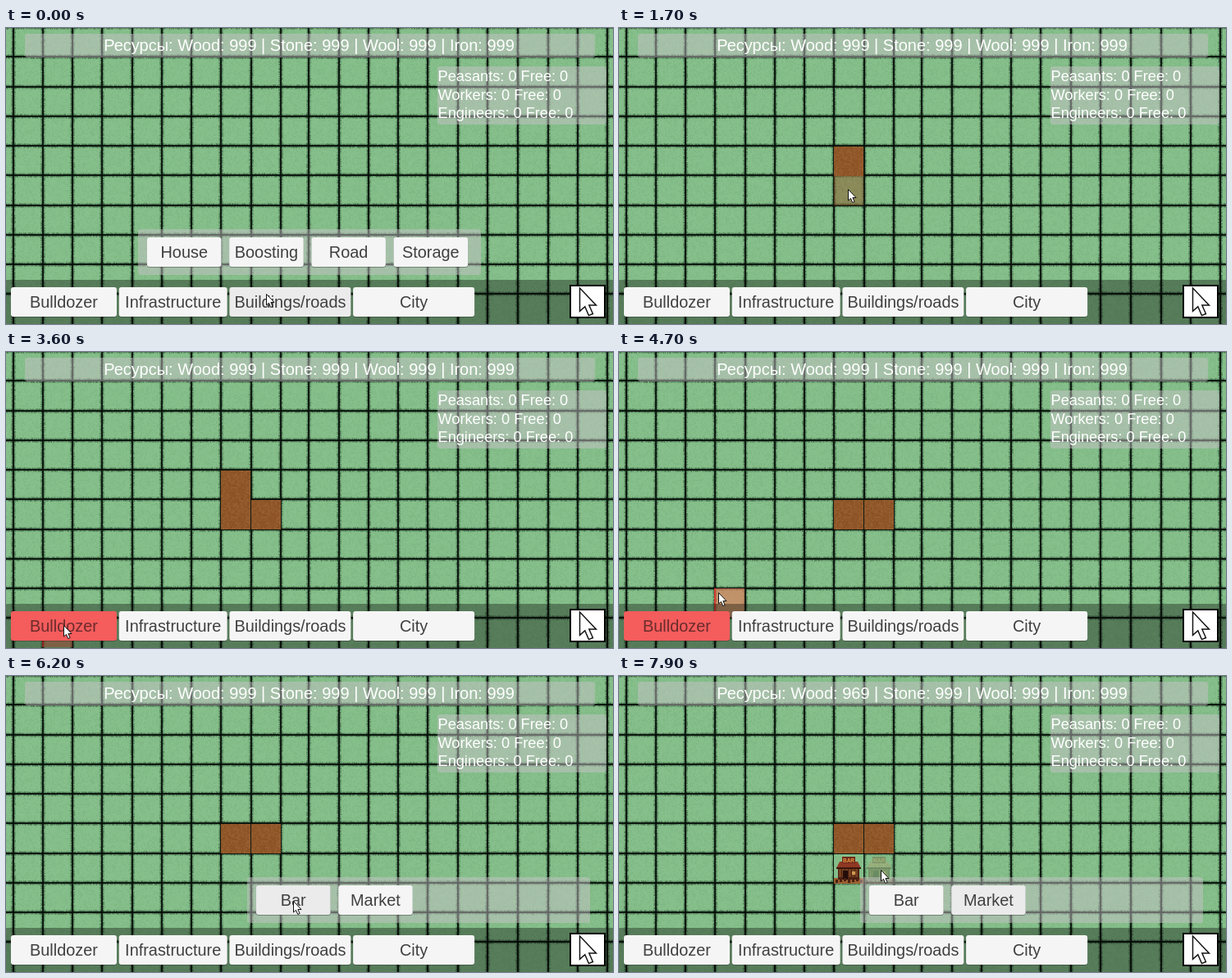
Write an HTML page with a canvas that moves like this. It is 740 px wide and 362 px high and loops after 8 s.

```html
<!DOCTYPE html>
<html>
<head>
<meta charset="utf-8">
<style>
html, body { margin: 0; width: 740px; height: 362px; overflow: hidden; }
canvas { display: block; }
</style>
</head>
<body>
<canvas id="stage" width="740" height="362"></canvas>
<script>
const g = document.getElementById('stage').getContext('2d');
const LOOP = 8000, STEP = 100, HOLD = 200, CELL = 36.22, X0 = 8.75, Y0 = -0.8;
const GLASS = 'rgba(200,194,200,.48)';

// The middle block of columns sits slightly to the left
const cellX = c => Math.round(X0 + c * CELL - (c > 9 && c < 17 ? 1.5 : 0));
const cellY = r => Math.round(Y0 + r * CELL);
const within = (t, a, b) => t >= a && t < b;

let seed = 7;
const rnd = () => (seed = (seed * 16807) % 2147483647) / 2147483647;

function layer(w, h, paint) {
  const c = document.createElement('canvas');
  c.width = w;
  c.height = h;
  paint(c.getContext('2d'), w, h);
  return c;
}

function rect(c, color, x, y, w, h) {
  c.fillStyle = color;
  c.fillRect(x, y, w, h);
}

function texture(c, color, w, h, strength) {
  rect(c, color, 0, 0, w, h);
  for (let y = 0; y < h; y += 2)
    for (let x = 0; x < w; x += 2)
      rect(c, `rgba(${rnd() < .5 ? '0,0,0' : '255,255,255'},${rnd() * strength})`, x, y, 2, 2);
}

// Rough hand-drawn line: soft edge, ragged fringe, dark core
function roughLine(c, at, length, vertical) {
  const strip = (color, off, along, size, len) => vertical
    ? rect(c, color, at + off, along, size, len)
    : rect(c, color, along, at + off, len, size);
  strip('rgba(30,70,40,.12)', -3, 0, 6, length);
  for (let i = 0; i < length; i++) {
    const a = rnd() * 1.8, b = rnd() * 1.8;
    strip('rgba(8,25,12,.38)', -1 - a, i, 2 + a + b, 1);
  }
  strip('rgba(5,14,7,.88)', -1, 0, 2, length);
}

const field = layer(740, 362, (c, w, h) => {
  texture(c, '#84be89', w, h, .03);
  for (let i = 0; i <= 20; i++) roughLine(c, cellX(i), h, true);
  for (let i = 0; i < 10; i++) roughLine(c, cellY(i), w, false);
});

const road = layer(36, 36, (c, w, h) => texture(c, '#905627', w, h, .055));

function shop(sign, roof) {
  return layer(36, 36, (c, w, h) => {
    texture(c, '#84be89', w, h, .03);
    rect(c, '#9b6030', 0, 29, w, 7);
    rect(c, '#4a2114', 5, 15, 26, 16);
    for (let x = 6; x < 30; x += 4) rect(c, '#75401f', x, 18, 3, 10);
    c.fillStyle = roof;
    c.beginPath();
    [[7, 9], [29, 9], [33, 17], [3, 17]].forEach(p => c.lineTo(...p));
    c.fill();
    rect(c, '#3b160d', 3, 16, 30, 2);
    rect(c, '#6e2819', 10, 3, 16, 8);
    c.fillStyle = '#e79a44';
    c.font = 'bold 6.5px "Liberation Sans", sans-serif';
    c.textAlign = 'center';
    c.fillText(sign, 18, 9.5);
    rect(c, '#240d09', 11, 20, 6, 11);
    rect(c, '#d29a50', 22, 21, 4, 4);
    for (let x = 2; x < 34; x += 5) rect(c, '#4a2012', x, 29 + x % 3, 3, 4);
  });
}
const bar = shop('BAR', '#8f3824');
const market = shop('MAR', '#c98a5a');

// Pointer stops: arrival time, x, y; it rests there for HOLD
const stops = [
  [0, 317, 325], [700, 384, 275], [1100, 265, 175], [1800, 281, 200],
  [2400, 321, 200], [3400, 70, 334], [4100, 273, 168], [4600, 121, 294],
  [5000, 72, 334], [5400, 315, 320], [5800, 495, 328], [6100, 350, 275],
  [6450, 280, 233], [6800, 397, 294], [7100, 530, 318], [7400, 450, 275],
  [7800, 319, 237]
];

function pointer(t) {
  const i = Math.max(0, stops.findLastIndex(s => s[0] <= t));
  const [t0, x0, y0] = stops[i];
  const [t1, x1, y1] = stops[i + 1] || [LOOP + HOLD, x0, y0];
  const k = Math.max(0, (t - t0 - HOLD) / (t1 - t0 - HOLD));
  const e = k * k * (3 - 2 * k);
  return [Math.round(x0 + (x1 - x0) * e), Math.round(y0 + (y1 - y0) * e)];
}

const put = (image, c, r) => g.drawImage(image, cellX(c), cellY(r) + 1);

function panel(x, y, w, h, color) {
  g.fillStyle = color;
  g.beginPath();
  g.roundRect(x, y, w, h, 3);
  g.fill();
}

function text(str, x, y, size, color, align) {
  g.font = size + 'px "Liberation Sans", Arial, sans-serif';
  g.fillStyle = color;
  g.textAlign = align;
  g.fillText(str, x, y);
}

function button(label, x, y, w, ui) {
  const [mx, my] = ui.mouse;
  const over = within(mx, x, x + w) && within(my, y, y + 36);
  const red = ui.bulldozing && label === 'Bulldozer';
  panel(x, y + 1, w, 36, 'rgba(40,40,40,.4)');
  panel(x, y, w, 36, red ? '#f55c5c' : over || ui.selected === label ? '#ebebeb' : '#f5f5f5');
  text(label, x + w / 2, y + 25, 19.9, red ? '#6b2c2c' : '#404040', 'center');
}

function menu(x, labels, ui) {
  panel(x, 246, 418, 56, GLASS);
  labels.forEach((label, i) => button(label, x + 11 + i * 100.2, 256, 90.5, ui));
}

function toolbar(ui) {
  rect(g, 'rgba(0,0,0,.35)', 0, 308, 740, 54);
  const widths = { Bulldozer: 129, Infrastructure: 132, 'Buildings/roads': 148, City: 148 };
  let x = 6;
  for (const label in widths) {
    button(label, x, 317, widths[label], ui);
    x += widths[label] + 2.7;
  }
}

function arrow(x, y, scale, line) {
  g.save();
  g.translate(x, y);
  g.scale(scale, scale);
  g.beginPath();
  [[0, 0], [0, 13.5], [3, 10.8], [5.2, 16], [7.6, 15], [5.4, 10], [9.5, 10]]
    .forEach(p => g.lineTo(...p));
  g.closePath();
  g.fillStyle = '#fff';
  g.fill();
  g.strokeStyle = '#111';
  g.lineWidth = line;
  g.stroke();
  g.restore();
}

// The preview snaps to the cell the pointer was over one step earlier
function drawGhost(t, bulldozing) {
  const [x, y] = pointer(t - STEP);
  const c = Math.floor((x - X0) / CELL), r = Math.floor((y - Y0) / CELL);
  if (bulldozing) {
    rect(g, 'rgba(231,122,87,.62)', cellX(c), cellY(r), 36, 36);
    rect(g, '#d33a30', cellX(c) - 1, cellY(r), 2, 36);
    return;
  }
  const image = within(t, 900, 2800) ? road
    : within(t, 6200, 7100) ? bar
    : t >= 7500 ? market : null;
  if (!image) return;
  g.globalAlpha = image === road ? .5 : .28;
  put(image, c, r);
  g.globalAlpha = 1;
}

function draw(t) {
  const built = t >= 6600;
  const ui = {
    mouse: pointer(t),
    bulldozing: within(t, 3500, 5000),
    selected: within(t, 800, 1400) ? 'Road'
      : within(t, 5000, 5500) ? 'Bulldozer'
      : within(t, 6200, 6600) ? 'Bar'
      : t >= 7500 ? 'Market' : ''
  };

  g.drawImage(field, 0, 0);
  drawGhost(t, ui.bulldozing);
  if (within(t, 1400, 4200)) put(road, 7, 4);
  if (t >= 1900) put(road, 7, 5);
  if (t >= 2400) put(road, 8, 5);
  if (built) put(bar, 7, 6);

  panel(23, 7, 695, 29, GLASS);
  text(`Ресурсы: Wood: ${built ? 969 : 999} | Stone: 999 | Wool: 999 | Iron: 999`,
    369.5, 27.5, 20, '#fff', 'center');
  panel(526, 47, 206, 71, GLASS);
  ['Peasants', 'Workers', 'Engineers'].forEach((name, i) =>
    text(name + ': 0 Free: 0', 526.5, 65 + i * 22.7, 18.2, '#fff', 'left'));

  toolbar(ui);
  if (t < 1400 || within(t, 5400, 5800)) menu(161, ['House', 'Boosting', 'Road', 'Storage'], ui);
  if (within(t, 5800, 6600) || t >= 7200) menu(294, ['Bar', 'Market'], ui);

  rect(g, '#000', 687, 314, 44, 41);
  rect(g, '#fff', 689, 316, 40, 37);
  arrow(699.5, 318, 2.1, .7);
  arrow(ui.mouse[0] + .5, ui.mouse[1] + .5, 1, 1);
}

const start = performance.now();
function frame() {
  const t = (performance.now() - start) % LOOP;
  draw(Math.floor(t / STEP) * STEP);
  requestAnimationFrame(frame);
}
frame();
</script>
</body>
</html>
```
